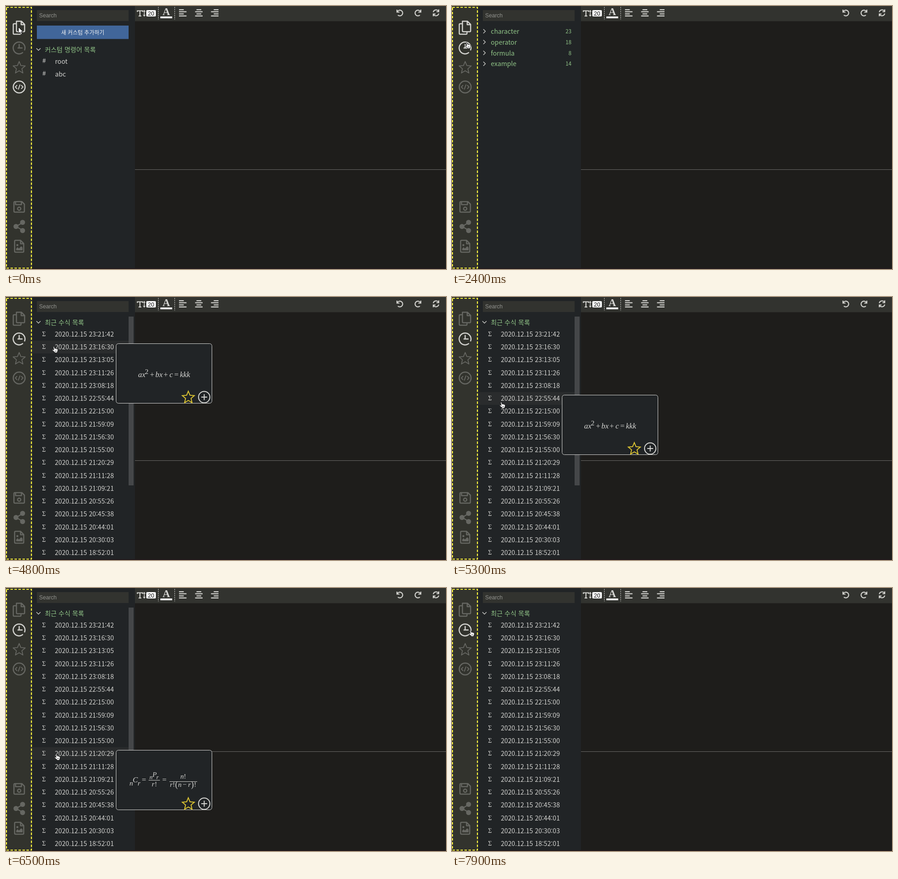
An HTML page that plays this animation: 969 by 578 pixels, repeating every 8000 ms.

```html
<!DOCTYPE html>
<html lang="ko">
<head>
<meta charset="utf-8">
<title>Formula editor</title>
<style>
html, body { margin: 0; width: 100%; height: 100%; overflow: hidden; background: #1e1d1b; }
svg { position: absolute; left: 0; top: 0; width: 969px; height: 578px; }
text { font: 14.2px "Noto Sans CJK KR", "Noto Sans CJK", "Noto Sans", sans-serif; fill: #d3d3d0; white-space: pre; }
.head { fill: #90c487; }
.count { font-size: 11.8px; text-anchor: end; }
.sans { font-family: "Liberation Sans", Arial, sans-serif; }
.sigma { font: 14px "Liberation Serif", serif; }
.math { font: 17px "Liberation Serif", serif; fill: #d6d6d3; }
.it { font-style: italic; }
.line { fill: none; stroke: #d0d0cc; stroke-width: 1.4; }
.icon { fill: none; stroke: currentColor; stroke-width: 2.5; color: #666762; stroke-linejoin: round; }
.icon.on { color: #d2d2ce; }
.solid { fill: currentColor; stroke: none; }
.tool { fill: none; stroke: #d2d2ce; stroke-width: 2.2; }
</style>
</head>
<body>
<svg viewBox="0 0 969 578">
  <rect width="969" height="578" fill="#1e1d1b"/>
  <rect width="58" height="578" fill="#32332d"/>
  <rect x="58" width="226" height="578" fill="#212426"/>
  <rect x="284" width="685" height="33.5" fill="#32332f"/>
  <rect x="284" y="359" width="685" height="1" fill="#6c6b68"/>
  <rect y="576" width="969" height="2" fill="#21191b"/>
  <rect x="68" y="9" width="202" height="24" fill="#32332f"/>
  <text class="sans" x="73" y="25" style="font-size:12.2px;fill:#92938f">Search</text>

  <g class="tool">
    <path d="M289.300 13v-2.500h11.500V13M295 10v12M292 22h6"/>
    <path d="M304.500 11v10" stroke-width="1.6"/>
    <path d="M301.500 12.500l3-4 3 4zM301.500 19.500l3 4 3-4z" fill="#d2d2ce" stroke="none"/>
    <rect x="309" y="9" width="21" height="14" rx="2" fill="#fff" stroke="none"/>
    <path d="M335.500 2v28M371.500 2v28" stroke-width="1" stroke-dasharray="2.7 1.8"/>
    <rect x="340" y="23" width="26" height="4" fill="#fff" stroke="none"/>
    <path id="alignLeft" d="M381 8.100h10.500M381 12.700h16.500M381 17.300h10.500M381 21.900h16.500"/>
    <path d="M419.500 8.100h10.500M416.500 12.700h16.500M419.500 17.300h10.500M416.500 21.900h16.500"/>
    <use href="#alignLeft" transform="matrix(-1 0 0 1 849 0)"/>
    <path id="undo" d="M861 8v5.500h5.500M861.500 13a6.300 6.300 0 1 1 1.500 7"/>
    <use href="#undo" transform="matrix(-1 0 0 1 1774.500 0)"/>
    <path d="M941 13.500a6.300 6.300 0 0 1 11.500-2M953 7.500v5h-5M953 16.500a6.300 6.300 0 0 1-11.500 2M941 22.500v-5h5"/>
  </g>
  <text class="sans" x="319.500" y="20.500" text-anchor="middle" style="font-size:12.500px;fill:#111">20</text>
  <text x="353" y="20" text-anchor="middle" style="font:bold 23px 'Liberation Serif',serif">A</text>

  <g id="files" class="icon">
    <path d="M23 33.500h11l7 7v14a2 2 0 0 1-2 2H25a2 2 0 0 1-2-2zM33.500 33.500v7.500H41M22 39h-4a2 2 0 0 0-2 2v19a2 2 0 0 0 2 2h13a2 2 0 0 0 2-2v-3"/>
  </g>
  <g id="clock" class="icon"><path d="M40.700 97.400A13 13 0 1 0 37.400 101.900M29 83.500v8.700M25.500 92.200H36.500"/></g>
  <g id="star" class="icon" style="stroke-width:1.900"></g>
  <g id="code" class="icon">
    <circle cx="29" cy="178" r="13"/>
    <path d="M24.500 174l-4 4 4 4M33.500 174l4 4-4 4M31 172.500l-4 11" stroke-width="2"/>
  </g>
  <g class="icon">
    <path d="M19.500 430h15.500l5.500 5.500v15.500a2 2 0 0 1-2 2h-19a2 2 0 0 1-2-2v-19a2 2 0 0 1 2-2zM21 430v6.500h13V430"/>
    <circle cx="29" cy="445.500" r="3.500"/>
    <path d="M37 476l-15 8.500 15 8.500"/>
    <g class="solid"><circle cx="36.500" cy="475.500" r="5.500"/><circle cx="22" cy="484.500" r="5.500"/><circle cx="36.500" cy="493.500" r="5.500"/></g>
    <path d="M21 515h11l7 7v17a2 2 0 0 1-2 2H21a2 2 0 0 1-2-2v-22a2 2 0 0 1 2-2zM32 515v7.500h7"/>
    <path class="solid" d="M22.500 537v-4l3-3 3 3 5-5 3 3v6z"/>
    <circle class="solid" cx="25" cy="525.500" r="2.300"/>
  </g>

  <rect x="1" y="3" width="55" height="573" fill="none" stroke="#fdf73c" stroke-width="2.200" stroke-dasharray="5.300 3.500"/>

  <g id="custom">
    <rect x="68" y="43" width="202" height="29.500" fill="#41669a"/>
    <text x="169" y="62.500" text-anchor="middle" style="font-size:12px;fill:#f0f2f4">새 커스텀 추가하기</text>
  </g>
  <g id="groups"></g>
  <g id="recent"></g>
  <rect id="thumb" x="270" y="43" width="11" height="371" fill="#454749"/>
  <g id="hint">
    <rect x="42.500" y="97.500" width="95" height="26" rx="3" fill="#1a1a1a" stroke="#3c3d3d"/>
    <text x="90" y="115" text-anchor="middle" style="font-size:12px">최근 수식 목록</text>
  </g>
  <g id="card">
    <rect x="242.500" y=".5" width="211" height="131" rx="5" fill="#212426" stroke="#d6d6d4"/>
    <g id="quadratic"></g>
    <g id="combination"></g>
    <g id="cardStar" fill="none" stroke="#e3ca32" stroke-width="1.900"></g>
    <g fill="none" stroke="#d8d8d5" stroke-width="2"><circle cx="436.500" cy="118" r="12.500"/><path d="M430 118h13M436.500 111.500v13"/></g>
  </g>
  <path id="arrow" d="M.5 .5v14l3.300-3 2.200 5 2.400-1-2.200-5h4.300z" fill="#fff" stroke="#111"/>
  <path id="hand" d="M3 1.500q1-1.500 2.200 0l1 3.500 2 .2 2 .6 2 .8 1 1.400-.4 3-1 1.500v2H6v-1.500L1 9q-.3-1.500 1.500-1.500l2 1z M7.500 10v2M9.500 10v2" fill="#fff" stroke="#151515" stroke-width=".9"/>
</svg>
<script>
const $ = id => document.getElementById(id);
const LOOP = 8000, STEP = 100, ROW_TOP = 68, ROW_H = 28.235;

const label = (x, y, str, cls = '') => `<text x="${x}" y="${y}" class="${cls}">${str}</text>`;
const chevron = (y, open) =>
  `<path class="line" d="${open ? `M67 ${y - 2.500}l4.500 4.500 4.500-4.500` : `M69 ${y - 4.500}l4.500 4.500-4.500 4.500`}"/>`;

function star(cx, cy, r) {
  const points = Array.from({ length: 10 }, (_, i) => {
    const a = (i / 5 - .5) * Math.PI, d = i % 2 ? r * .45 : r;
    return `${(cx + d * Math.cos(a)).toFixed(1)},${(cy + d * Math.sin(a)).toFixed(1)}`;
  });
  return `<polygon points="${points.join(' ')}"/>`;
}

// Each piece: x, baseline, text, size; letters are set in italics.
const formula = pieces => pieces.map(([x, y, str, size = 17]) =>
  `<text class="math${/[a-z]/i.test(str) ? ' it' : ''}" x="${x}" y="${y}" style="font-size:${size}px">${str}</text>`).join('');

$('star').innerHTML = star(29, 136, 14);
$('cardStar').innerHTML = star(401.5, 119, 14);

$('custom').innerHTML += chevron(95.5, true) + label(85.5, 101, '커스텀 명령어 목록', 'head') +
  ['root', 'abc'].map((name, i) => label(80, 125 + 28 * i, '#') + label(108, 127 + 28 * i, name)).join('');

$('groups').innerHTML = [['character', 23], ['operator', 18], ['formula', 8], ['example', 14]]
  .map(([name, n], i) => {
    const y = 61 + 23.8 * i;
    return chevron(y - 5.5) + label(85.5, y, name, 'head') + label(263, y - 1, n, 'head count');
  }).join('');

const times = `23:21:42 23:16:30 23:13:05 23:11:26 23:08:18 22:55:44 22:15:00 21:59:09 21:56:30
  21:55:00 21:20:29 21:11:28 21:09:21 20:55:26 20:45:38 20:44:01 20:30:03 18:52:01`.split(/\s+/);
$('recent').innerHTML =
  `<rect id="hover" x="58" width="212" height="28" fill="#2a2c2d"/>` +
  chevron(55.5, true) + label(85.5, 61, '최근 수식 목록', 'head') +
  times.map((time, i) => {
    const y = 87 + ROW_H * i;
    return label(79.5, y - 1, 'Σ', 'sigma') + label(107.5, y, '2020.12.15 ' + time);
  }).join('');

$('quadratic').innerHTML = formula([
  [291, 73.5, 'ax'], [306, 67, '2', 15.5], [317, 73.5, '+'], [329, 73.5, 'bx'], [347, 73.5, '+'],
  [360, 73.5, 'c'], [370.5, 73.5, '='], [383, 73.5, 'kkk']]);
$('combination').innerHTML = formula([
  [272, 78, 'n', 15.5], [279, 71, 'C'], [290, 78, 'r', 15.5], [299, 71, '='],
  [316, 64, 'n', 13.5], [322.5, 58.5, 'P', 15.3], [331, 64, 'r', 13.5],
  [321, 79.5, 'r', 15.3], [327.5, 79.5, '!', 15.3], [344, 71, '='],
  [384, 63, 'n', 15.3], [391.5, 63, '!', 15.3], [361, 81, 'r', 15.3], [367, 81, '!', 15.3],
  [372.5, 82, '(', 18], [379, 81, 'n', 15.3], [389, 81, '−', 15.3], [401, 81, 'r', 15.3],
  [407.5, 82, ')', 18], [414, 81, '!', 15.3]]) +
  '<path class="line" style="stroke-width:1" d="M314 66.500h25M360 69.500h61"/>';

// Cursor moves: first step, last step, end x, end y.
const moves = [
  [0, 0, 27, 46], [100, 100, 25, 47], [1900, 2000, 54, 61], [2400, 2400, 28, 79],
  [2500, 2500, 29, 81], [2700, 2700, 27, 82], [4300, 4600, 100, 84], [4800, 5300, 104, 230],
  [5400, 5600, 105, 302], [5700, 6200, 106, 418], [6400, 6500, 106, 364], [6600, 6700, 106, 312],
  [6900, 7100, 105, 212], [7200, 7600, 104, 112], [7800, 7900, 36, 92]];

function cursorAt(t) {
  let x = 0, y = 0;
  for (const [from, to, endX, endY] of moves) {
    if (t < from) break;
    const p = Math.min(1, (t - from + STEP) / (to - from + STEP));
    x += (endX - x) * p;
    y += (endY - y) * p;
  }
  return [Math.round(x), Math.round(y)];
}

const show = (id, on) => $(id).style.display = on ? '' : 'none';
const light = (id, on) => $(id).classList.toggle('on', on);
const moveTo = (id, x, y) => $(id).setAttribute('transform', `translate(${x} ${y})`);

function draw(now) {
  const t = Math.floor(now % LOOP / STEP) * STEP;
  const [x, y] = cursorAt(t);
  const pointing = t >= 100 && !(t >= 1900 && t < 2400);
  const inList = t >= 4000 && x > 58;
  const row = Math.floor((y + 1 - ROW_TOP) / ROW_H);

  show('custom', t < 1000);
  show('groups', t >= 1000 && t < 4000);
  show('recent', t >= 4000);
  show('hint', t >= 3100 && t < 3800);
  light('files', t < 4000);
  light('clock', t >= 2400);
  light('code', t < 1000);

  for (const id of ['hover', 'card', 'thumb']) show(id, inList);
  $('hover').setAttribute('y', Math.round(ROW_TOP + row * ROW_H));
  moveTo('card', 0, Math.round(73.8 + row * ROW_H));
  show('quadratic', row < 8);
  show('combination', row >= 8);

  show('arrow', !pointing);
  show('hand', pointing);
  moveTo(pointing ? 'hand' : 'arrow', x, y);
}

const start = performance.now();
function tick() {
  draw(performance.now() - start);
  requestAnimationFrame(tick);
}
tick();
</script>
</body>
</html>
```
